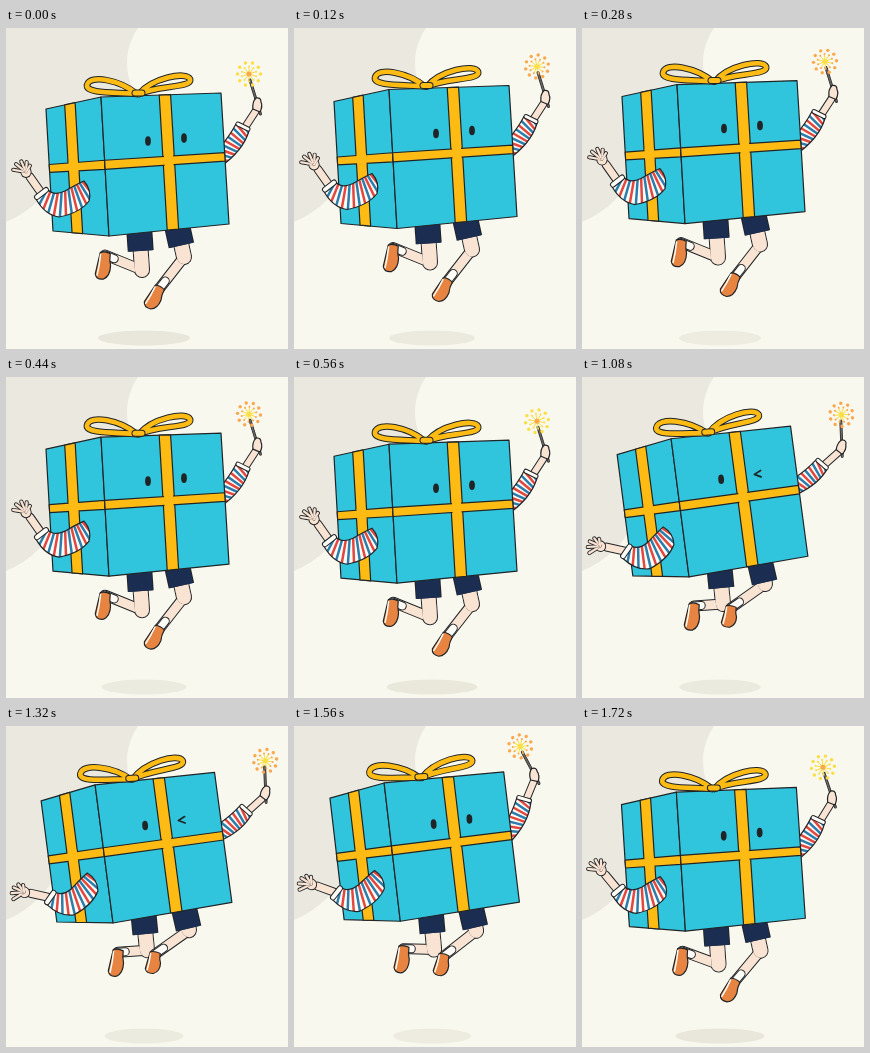
Animation of 282x321 px, one loop 1760 ms. Source, as an HTML page with a canvas:

```html
<!DOCTYPE html>
<html lang="en">
<head>
<meta charset="utf-8">
<title>Jumping gift</title>
<style>
  html, body { margin: 0; width: 100%; height: 100%; overflow: hidden; background: #f9f8ee; }
  canvas { display: block; width: 282px; height: 321px; }
</style>
</head>
<body>
<canvas id="stage" width="282" height="321"></canvas>
<script>
const ctx = document.getElementById('stage').getContext('2d');
const LOOP = 1760, STEP = 40, HOP = LOOP / 3, RAD = Math.PI / 180;
const INK = '#202427', SKIN = '#f9e3d3', CYAN = '#30c5dd', GOLD = '#fdbb14', NAVY = '#1b2e52',
      WHITE = '#fdfcf7', RED = '#e2483f', BLUE = '#2b7dac', SHOE = '#e78442', SPARK = '#fba84c',
      LEMON = '#fbdf45', CREAM = '#f9f8ee', BEIGE = '#ebe9df', SHADE = '#e9e7db';

const lerp = (a, b, k) => a + (b - a) * k;
const mix = (p, q, k) => [lerp(p[0], q[0], k), lerp(p[1], q[1], k)];
const polar = ([x, y], degrees, r) => [x + r * Math.cos(degrees * RAD), y + r * Math.sin(degrees * RAD)];
const line = (...pts) => new Path2D('M' + pts.join('L'));

function smooth(from, to, t) {
  const x = Math.min(1, Math.max(0, (t - from) / (to - from)));
  return x * x * (3 - 2 * x);
}
// Rises at `on`, falls at `off`, each over `edge` ms.
const pulse = (on, off, edge, t) => smooth(on, on + edge, t) - smooth(off, off + edge, t);

function paint(path, fill, width = 1.2) {
  if (fill) { ctx.fillStyle = fill; ctx.fill(path); }
  if (width) { ctx.strokeStyle = INK; ctx.lineWidth = width; ctx.stroke(path); }
}

function band(path, width, color, edge = 2) {
  for (const [w, c] of [[width + edge, INK], [width, color]]) {
    ctx.lineWidth = w;
    ctx.strokeStyle = c;
    ctx.stroke(path);
  }
}

function dot([x, y], rx, ry, color) {
  ctx.fillStyle = color;
  ctx.beginPath();
  ctx.ellipse(x, y, rx, ry, 0, 0, 2 * Math.PI);
  ctx.fill();
}

function turned([x, y], degrees, draw, dx = 0, dy = 0) {
  ctx.save();
  ctx.translate(x + dx, y + dy);
  ctx.rotate(degrees * RAD);
  ctx.translate(-x, -y);
  draw();
  ctx.restore();
}

// Stripes fan out from a centre, alternating red and blue inside the sleeve.
function sleeve(path, centre, from, to, gap) {
  paint(path, WHITE, 0);
  ctx.save();
  ctx.clip(path);
  ctx.lineWidth = 2.5;
  for (let a = from, i = 0; a <= to; a += gap, i++) {
    ctx.strokeStyle = i % 2 ? BLUE : RED;
    ctx.stroke(line(centre, polar(centre, a, 90)));
  }
  ctx.restore();
  paint(path);
}

function background() {
  ctx.fillStyle = CREAM;
  ctx.fillRect(0, 0, 282, 321);
  dot([-40, 98], 104, 104, BEIGE);
  ctx.fillStyle = BEIGE;
  ctx.fillRect(0, 0, 136, 100);
  dot([182, 35], 61, 61, CREAM);
}

function shoe(ankle, degrees, size) {
  ctx.save();
  ctx.translate(...ankle);
  ctx.rotate(degrees * RAD);
  ctx.scale(1, size);
  paint(new Path2D('M-5,-2 Q0,-4 5,-2 Q5,5 7,10 Q8,20 2,24 Q-5,26 -7,20 Q-6,8 -5,-2Z'), SHOE);
  ctx.strokeStyle = WHITE;
  ctx.lineWidth = 1.5;
  ctx.stroke(new Path2D('M-4.5,0 Q-4,11 -5,21'));
  ctx.restore();
}

function leg(hip, knee, ankle, turn, size) {
  const thigh = line(hip, knee), calf = line(knee, ankle);
  const length = Math.hypot(knee[0] - hip[0], knee[1] - hip[1]);
  band(thigh, 14, SKIN);
  band(calf, 9, SKIN);
  band(thigh, 14, SKIN, 0);
  band(line(mix(knee, ankle, 0.75), ankle), 7, WHITE);
  shoe(ankle, turn, size);
  ctx.lineCap = 'butt';
  band(line(hip, mix(hip, knee, 25 / length)), 24, NAVY);
  ctx.lineCap = 'round';
}

function legs(s) {
  leg(mix([133, 198], [137, 192], s), mix([136, 242], [141, 233], s), mix([99, 227], [112, 235], s), 8, 1);
  leg(mix([170, 193], [177, 187], s), mix([178, 229], [183, 213], s), mix([153, 261], [149, 237], s),
      lerp(28, 10, s), lerp(0.9, 0.8, s));
}

function burst(centre, phase, spin) {
  const yellow = phase < 0.12 || phase > 0.9;
  const color = yellow ? LEMON : SPARK;
  ctx.lineWidth = 1;
  ctx.strokeStyle = LEMON;
  for (let a = spin; a < spin + 360; a += 36) {
    ctx.stroke(line(centre, polar(centre, a + 18, 6.5)));
    dot(polar(centre, a + 18, 7.5), 1, 1, color);
    dot(polar(centre, a, 11.5), 1.7, 1.7, color);
  }
  dot(centre, 2.5, 2.5, yellow ? SPARK : LEMON);
}

function rightArm(phase, spin) {
  band(line([236, 104], [251, 81]), 6, SKIN);
  sleeve(new Path2D('M214,119 Q223,109 230,96 L243,103 Q237,123 214,139Z'), [268, 141], 170, 250, 5);
  band(line([232, 96], [242, 101]), 3, WHITE);
  band(line([254.5, 86], [244, 52]), 1.6, '#6b6461', 1.3);
  paint(new Path2D('M247,81 Q246,74 250,70 Q255,69 255,74 Q257,78 254,84Z'), SKIN);
  burst([243, 46], phase, spin);
}

function hand(palm) {
  const fingers = [];
  for (let i = 0; i < 5; i++) fingers.push(line(palm, polar(palm, 190 + 28 * i, 13 - 0.35 * i * i)));
  fingers.forEach(f => band(f, 2.2, SKIN, 1.9));
  dot(palm, 5.6, 6, INK);
  dot(palm, 4.7, 5.1, SKIN);
  fingers.forEach(f => band(f, 2.2, SKIN, 0));
}

function leftArm(s) {
  const cuff = [36, 166];
  turned(cuff, -25 * s, () => {
    band(line(cuff, [24, 149]), 7, SKIN);
    hand([20, 144]);
  });
  sleeve(new Path2D('M78,153 Q86,162 83,173 Q74,185 53,189 Q39,187 30,171 L42,162 Q48,168 59,163 Q71,156 78,153Z'),
         [58, 130], 40, 124, 6);
  band(line([31, 169], [40, 162]), 4, WHITE);
}

// A quadrilateral face addressed by u (across) and v (down), both 0 to 1.
const face = (tl, tr, bl, br) => (u0, u1, v0, v1) => {
  const at = (u, v) => mix(mix(tl, tr, u), mix(bl, br, u), v);
  const path = line(at(u0, v0), at(u1, v0), at(u1, v1), at(u0, v1));
  path.closePath();
  return path;
};
const EDGE_TOP = [95, 69], EDGE_BOTTOM = [103, 208];
const side = face([40, 81], EDGE_TOP, [47, 203], EDGE_BOTTOM);
const front = face(EDGE_TOP, [215, 65], EDGE_BOTTOM, [223, 196]);

function wrapFace(part, u0, u1) {
  const v0 = 0.455, v1 = 0.52;
  paint(part(0, 1, 0, 1), CYAN);
  paint(part(u0, u1, 0, 1), GOLD);
  paint(part(0, 1, v0, v1), GOLD);
  paint(part(u0 + 0.01, u1 - 0.01, v0 - 0.01, v1 + 0.01), GOLD, 0);
}

function box(wink) {
  wrapFace(side, 0.34, 0.53);
  wrapFace(front, 0.485, 0.58);
  dot([142, 113], 2.9, 4.8, INK);
  if (wink) paint(line([182, 107], [175.5, 110.5], [182, 113.5]), null, 1.7);
  else dot([178, 110], 2.9, 4.8, INK);
  band(new Path2D('M131,66 C114,52 84,46 81,57 C79,66 112,64 131,66'), 4.6, GOLD);
  band(new Path2D('M133,66 C146,50 180,43 184,51 C187,60 152,57 133,66'), 4.6, GOLD);
  band(line([129, 65], [136, 65]), 5, GOLD);
}

function draw(t) {
  const phase = t / HOP % 1;
  const hop = Math.sin(Math.PI * phase);
  const sway = pulse(580, 1480, 300, t);
  const dip = pulse(830, 1310, 220, t);
  background();
  ctx.globalAlpha = 1 - 0.35 * hop;
  dot([138, 310], 46 - 5 * hop - 3 * sway, 7.6, SHADE);
  ctx.globalAlpha = 1;
  ctx.save();
  ctx.translate(0, -12.5 * hop);
  legs(sway);
  turned([159, 132.5], -4.1 * sway, () => {
    turned([221, 122], 28 * dip - 9 * sway, () => rightArm(phase, t / 2), 0, 4 * (dip - sway));
    box(t >= 1000 && t < 1360);
    turned([83, 163], -13 * sway, () => leftArm(sway), 5 * sway, 2 * sway);
  }, -1.5 * sway, -6 * sway);
  ctx.restore();
}

ctx.lineJoin = ctx.lineCap = 'round';
function frame() {
  draw(Math.floor(performance.now() % LOOP / STEP) * STEP);
  requestAnimationFrame(frame);
}
frame();
</script>
</body>
</html>
```
